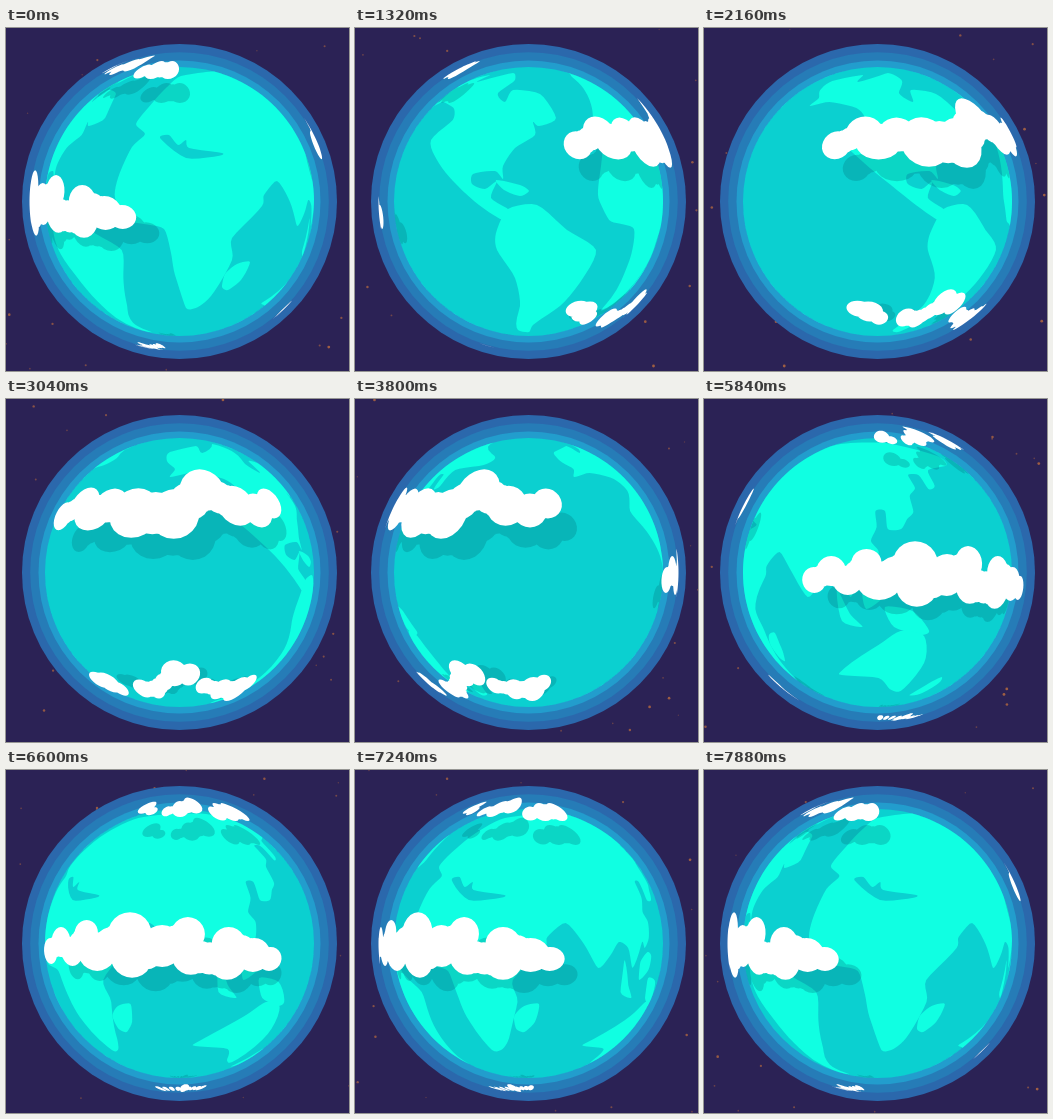
An HTML page with a canvas that plays this animation: 343x343 px, repeating every 7.92 s.

```html
<!DOCTYPE html>
<html lang="en">
<head>
<meta charset="utf-8">
<title>Turning globe</title>
<style>
html, body { margin: 0; width: 100%; height: 100%; overflow: hidden; background: #2b2255; }
canvas { display: block; width: 343px; height: 343px; }
</style>
</head>
<body>
<canvas id="stage"></canvas>
<script>
const LOOP = 7920, STEP = 40, SIZE = 343, MID = 173.5;
const GLOBE = 134.5, SKY = 150;
const RAD = Math.PI / 180;
const SEA = '#0bd0d0', LAND = '#10ffe2';
// Turns of the globe at which shapes are laid out.
const AFRICA = 0, AMERICA = 60, PACIFIC = 138.2, ASIA = -129.1;

const canvas = document.getElementById('stage');
const ratio = window.devicePixelRatio || 1;
canvas.width = canvas.height = Math.round(SIZE * ratio);
const ctx = canvas.getContext('2d');

const clamp = (v, lo, hi) => Math.max(lo, Math.min(hi, v));
const range = n => Array.from({ length: n }, (_, i) => i);
const mix = (a, b, k) => a + (b - a) * k;

let seed = 7;
function random() {
  seed = (seed * 16807) % 2147483647;
  return seed / 2147483647;
}

// Stage point on a sphere of radius r -> longitude and latitude in degrees.
function unproject(x, y, r) {
  const s = clamp((MID - y) / r, -0.995, 0.995);
  const ring = r * Math.sqrt(1 - s * s);
  return [Math.asin(clamp((x - MID) / ring, -1, 1)) / RAD, Math.asin(s) / RAD];
}

function project([lon, lat], r, turn) {
  const a = clamp(lon + turn, -90, 90) * RAD, b = clamp(lat, -89, 89) * RAD;
  return [MID + r * Math.cos(b) * Math.sin(a), MID - r * Math.sin(b)];
}

// Shapes wrap round the sphere; whatever is behind collapses onto the rim.
function trace(shape, r, turn) {
  for (const wrap of [-360, 0, 360]) {
    shape.forEach((p, i) => {
      const [x, y] = project(p, r, turn + wrap);
      i ? ctx.lineTo(x, y) : ctx.moveTo(x, y);
    });
    ctx.closePath();
  }
}

// Closed Catmull-Rom curve through the points, a little tightened.
function smooth(pts) {
  const n = pts.length;
  return pts.flatMap((p, i) => {
    const a = pts[(i + n - 1) % n], q = pts[(i + 1) % n], b = pts[(i + 2) % n];
    return range(5).map(j => {
      const t = j / 5, u = 1 - t;
      return [0, 1].map(d => {
        const c1 = p[d] + (q[d] - a[d]) * 0.12, c2 = q[d] - (b[d] - p[d]) * 0.12;
        return u * u * u * p[d] + 3 * u * u * t * c1 + 3 * u * t * t * c2 + t * t * t * q[d];
      });
    });
  });
}

const lands = [], lakes = [], puffs = [];

// Coast made of runs "x,y x,y ...", each as seen at its own turn of the globe.
function coast(...runs) {
  return smooth(runs.flatMap(([turn, path]) => path.split(' ').map(pair => {
    const [lon, lat] = unproject(...pair.split(',').map(Number), GLOBE);
    return [lon - turn, lat];
  })));
}
const land = (...runs) => lands.push(coast(...runs));

// Cloud of discs [x, y, radius], round as seen at their turn of the sky;
// smaller discs fill the spaces between neighbours.
function cloud(...runs) {
  const lumps = runs.flatMap(([turn, ...discs]) => discs.map(([x, y, size]) => {
    const [lon, lat] = unproject(x, y, SKY);
    const r = size / (SKY * Math.cos(lat * RAD)) / RAD;
    return [lon + turn, lat, r / Math.max(0.45, Math.cos(lon * RAD)), r];
  })).sort((a, b) => a[0] - b[0]);

  const fill = lumps.slice(1).flatMap((b, i) => [0.25, 0.5, 0.75].map(k => {
    const a = lumps[i];
    return [mix(a[0], b[0], k), mix(a[1], b[1], k), Math.min(a[2], b[2]) * 0.85, Math.min(a[3], b[3]) * 0.85];
  }));

  for (const [lon, lat, rx, ry] of lumps.concat(fill)) {
    puffs.push(range(24).map(i => {
      const a = i / 24 * 2 * Math.PI;
      return [lon + rx * Math.cos(a), lat + ry * Math.sin(a)];
    }));
  }
}

// Europe, Asia and Africa
land(
  [AFRICA, '180,280 169,247 165,225 158,201 138,196 122,192 109,170 112,150 126,119 139,106 130,96 142,80 160,60 175,48 200,44'],
  [ASIA, '160,44 205,57 207,66 175,71 172,87 163,90 160,76 149,76 149,89 140,97 138,113 130,120 122,130 110,130 ' +
    '112,112 104,112 101,128 94,142 99,152 97,168 90,178 86,172 78,198 70,178 62,172 57,185'],
  [AFRICA, '291,198 284,174 271,153 258,167 256,178 226,210 226,232 205,268 192,279']
);
land([AFRICA, '216,259 219,246 231,236 244,234 235,252 222,262']);

// The Americas
land(
  [AMERICA, '148,192 124,177 98,153 82,132 76,112'],
  [PACIFIC, '232,92 218,80 186,74 164,78 169,70 161,62 164,53 190,47'],
  [AMERICA, '122,54 158,45 160,52 143,65 150,74 158,62 185,66 201,90 184,98 178,94 180,107 160,120 148,138 148,151 ' +
    '140,143 118,146 117,156 130,161 142,153 136,170 154,182']
);
land([AMERICA, '141,152 165,157 174,163 165,168 149,162']);
land([AMERICA, '153,181 182,177 212,202 241,222 228,250 205,278 178,297 174,304 163,302 165,278 160,250 142,222 141,205']);

// Islands and Australia
land([ASIA, '68,190 80,215 92,228 76,222']);
land([ASIA, '86,192 95,182 103,186 102,200 91,210']);
land([ASIA, '106,208 132,212 154,232 145,236 118,228']);
land([ASIA, '96,272 110,246 125,232 150,237 162,264 159,292 146,290 127,279 99,276']);
land([ASIA, '174,296 184,284 195,278 198,284 186,295']);

// Inland sea
lakes.push(coast([AFRICA, '154,110 163,107 172,117 180,112 183,120 216,125 212,128 180,130']));

// Long northern cloud
cloud([60, [223, 117, 14], [245, 104, 16]],
  [138.2, [86, 113, 18], [104, 106, 17], [128, 113, 25], [168, 114, 25]],
  [172.7, [123, 90, 21], [152, 106, 20], [175, 111, 17], [192, 104, 15]]);
// Long equatorial cloud
cloud([230.9, [198, 181, 13], [216, 172, 15], [232, 182, 14], [249, 163, 13]],
  [300, [90, 182, 19], [123, 164, 22], [125, 187, 21], [156, 176, 21], [182, 164, 17], [185, 186, 19],
    [223, 174, 17], [222, 191, 19], [248, 185, 17], [264, 189, 12]]);
// Southern group
cloud([138.2, [93, 281, 8], [102, 284, 10], [114, 290, 7]]);
cloud([138.2, [137, 290, 9], [150, 291, 9], [168, 275, 13], [183, 276, 11]]);
cloud([172.7, [140, 287, 8], [160, 291, 10], [178, 291, 12], [188, 284, 8]]);
cloud([300, [155, 319, 2.5], [178, 319, 4], [195, 318, 2.5]]);
// Northern group
cloud([230.9, [212, 37, 6], [224, 41, 4]]);
cloud([300, [161, 41, 5], [174, 38, 8], [186, 34, 8]]);
cloud([360, [137, 43, 7], [150, 41, 9], [164, 41, 9]]);

// Starfield sliding past, six stages wide
const FIELD = SIZE * 6;
const stars = range(230).map(() => ({ x: random() * FIELD, y: random() * SIZE, glow: random() }));

function disc(x, y, r, color) {
  ctx.fillStyle = color;
  ctx.beginPath();
  ctx.arc(x, y, r, 0, 2 * Math.PI);
  ctx.fill();
}

function fillAll(shapes, r, turn, color) {
  ctx.fillStyle = color;
  ctx.beginPath();
  shapes.forEach(s => trace(s, r, turn));
  ctx.fill();
}

const shade = puffs.map(s => s.map(([lon, lat]) => [lon + 8, lat - 7.6]));

function draw(t) {
  const turn = t / LOOP * 360;
  ctx.setTransform(ratio, 0, 0, ratio, 0, 0);
  ctx.fillStyle = '#2b2255';
  ctx.fillRect(0, 0, SIZE, SIZE);
  for (const s of stars) {
    const x = (s.x + FIELD * (1 - t / LOOP)) % FIELD;
    disc(x, s.y, 0.7 + s.glow * 0.7, `rgba(190,110,62,${0.3 + s.glow * 0.5})`);
  }

  disc(MID, MID, 157.5, '#2b68ac');
  disc(MID, MID, 149.3, '#267cb7');
  disc(MID, MID, 141, '#229dcd');
  disc(MID, MID, GLOBE, SEA);
  lands.forEach(s => fillAll([s], GLOBE, turn, LAND));
  fillAll(lakes, GLOBE, turn, SEA);

  // Clouds drift against the globe and throw their shade on it.
  fillAll(shade, GLOBE, -turn, 'rgba(0,120,130,0.3)');
  fillAll(puffs, SKY, -turn, '#fff');
}

function tick() {
  const t = performance.now() % LOOP;
  draw(Math.floor(t / STEP) * STEP);
  requestAnimationFrame(tick);
}
tick();
</script>
</body>
</html>
```
